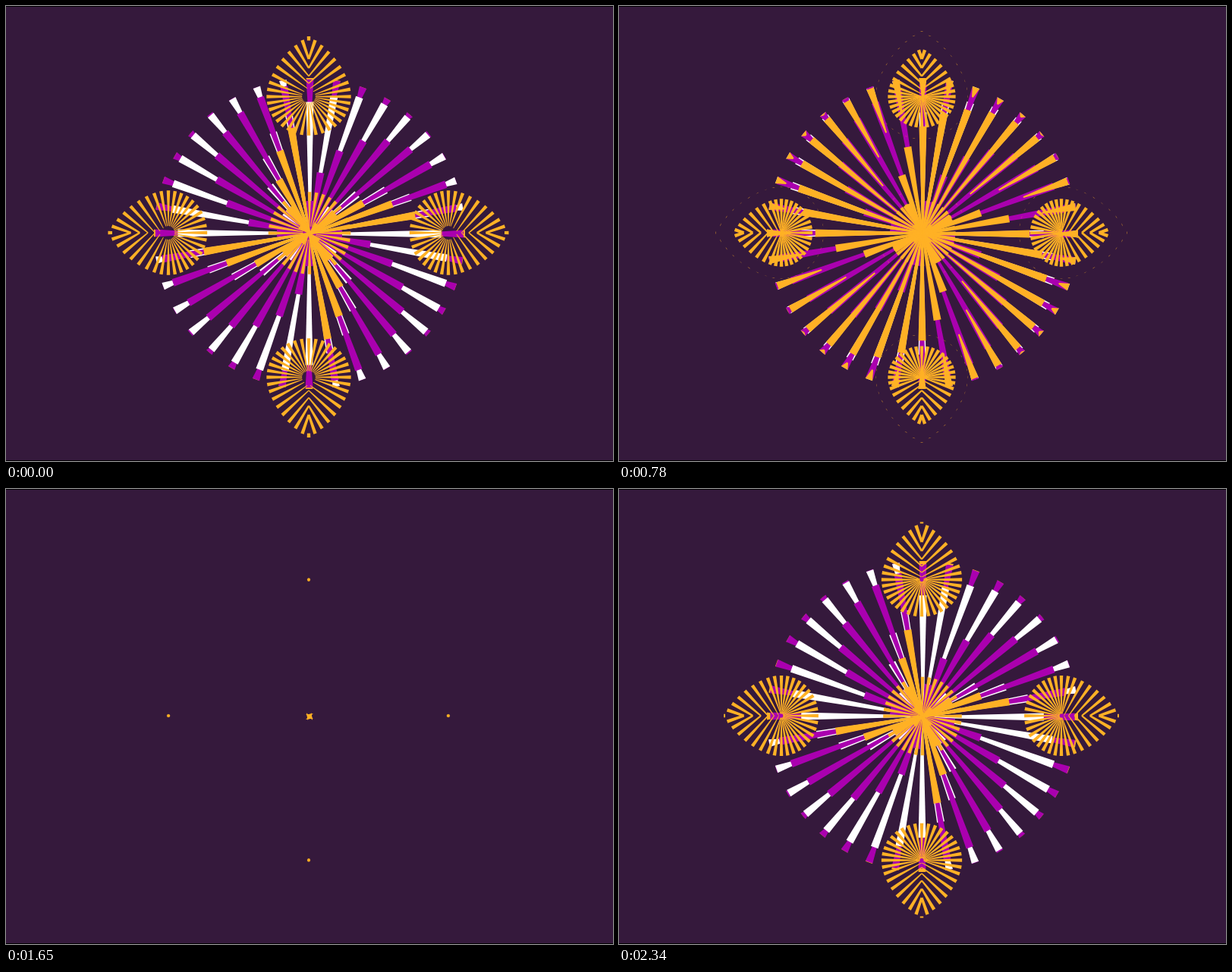
An HTML page with a canvas that plays this animation: 800x600 px, repeating every 2370 ms.

```html
<!DOCTYPE html>
<html>
<head>
<meta charset="utf-8">
<style>
  html, body { margin: 0; width: 100%; height: 100%; overflow: hidden; background: #35193c; }
  canvas { display: block; }
</style>
</head>
<body>
<canvas id="stage" width="800" height="600"></canvas>
<script>
const ctx = document.getElementById('stage').getContext('2d');
const STEP = 30, STEPS = 79, PHASE = 25;
const GROW = 15, HOLD = 7;
const BG = '#35193c', ORANGE = '#ffb125', PURPLE = '#aa00af', WHITE = '#ffffff';
const RAD = Math.PI / 180;

// Bottom to top: the opening pair, then trios with the newest lowest.
const rayLayers = [[ORANGE, 0], [PURPLE, 4]];
for (let start = 36; start >= 9; start -= 9) {
  rayLayers.push([WHITE, start], [PURPLE, start + 5], [ORANGE, start + 10]);
}
const burstStarts = [0, 15.4, 30.5, 44.5];
const petals = [[399, 119.5, 0], [583, 299, 90], [399, 489.5, 180], [214, 299, 270]];

// cubic-bezier(.336, 0, .145, 1) over GROW steps
function ease(age) {
  const x = age / GROW;
  if (x <= 0) return 0;
  if (x >= 1) return 1;
  let lo = 0, hi = 1;
  for (let i = 0; i < 24; i++) {
    const s = (lo + hi) / 2, q = 1 - s;
    if (3 * q * q * s * 0.336 + 3 * q * s * s * 0.145 + s * s * s < x) lo = s;
    else hi = s;
  }
  return lo * lo * (3 - 2 * lo);
}

const span = age => [ease(age - HOLD), ease(age)];

function wedge(x1, y1, w1, x2, y2, w2) {
  const len = Math.hypot(x2 - x1, y2 - y1);
  if (!len) return;
  const nx = (y1 - y2) / len / 2, ny = (x2 - x1) / len / 2;
  ctx.beginPath();
  ctx.moveTo(x1 + nx * w1, y1 + ny * w1);
  ctx.lineTo(x2 + nx * w2, y2 + ny * w2);
  ctx.lineTo(x2 - nx * w2, y2 - ny * w2);
  ctx.lineTo(x1 - nx * w1, y1 - ny * w1);
  ctx.fill();
}

function place(x, y, degrees, draw) {
  ctx.save();
  ctx.translate(x, y);
  ctx.rotate(degrees * RAD);
  draw();
  ctx.restore();
}

function drawRays(color, age) {
  ctx.fillStyle = color;
  for (let i = 0; i < 36; i++) {
    const [from, to] = span(age - (8 - i % 9));
    if (to > from) {
      place(400, 300, i * 10, () => wedge(0.5, -205 * from, 2, 0.5, -205 * to, 10));
    }
  }
}

// Fine spokes; a stretched tip bends the upper ones into chevrons.
function drawBurst(radius, stretch, squash, [from, to]) {
  for (let i = -17; i <= 18; i++) {
    const angle = i * 10 * RAD;
    const extra = stretch * Math.max(0, 1 - Math.abs(i) / 7) ** 1.5;
    const cos = Math.cos(angle);
    const tipX = radius * Math.sin(angle);
    const tipY = radius * cos * (cos < 0 ? squash : 1) + extra;
    const base = i || !stretch ? 2.4 * extra : 74;
    const floor = base / (radius + stretch);
    const start = Math.max(from, floor);
    if (to <= start) continue;
    const point = level => {
      const u = (level - floor) / (1 - floor);
      return [tipX * u, -(base + (tipY - base) * u)];
    };
    const startWidth = 0.8 + 3.7 * (start - from) / (to - from);
    wedge(...point(start), startWidth, ...point(to), 4.5);
  }
}

function render(n) {
  ctx.fillStyle = BG;
  ctx.fillRect(0, 0, 800, 600);
  for (const [color, start] of rayLayers) drawRays(color, n - start);
  ctx.fillStyle = ORANGE;
  for (const start of burstStarts) {
    const range = span(n - start);
    if (range[1] <= range[0]) continue;
    place(400, 299.5, 0, () => drawBurst(59, 0, 1, range));
    for (const [x, y, turn] of petals) {
      place(x, y, turn, () => drawBurst(60.5, 26, 0.92, range));
    }
  }
  ctx.fillStyle = '#000';
  ctx.fillRect(0, 0, 800, 1);
  ctx.fillRect(0, 599, 800, 1);
}

const origin = performance.now();
function tick() {
  const step = Math.floor((performance.now() - origin) / STEP);
  render((step + PHASE) % STEPS);
  requestAnimationFrame(tick);
}
tick();
</script>
</body>
</html>
```
